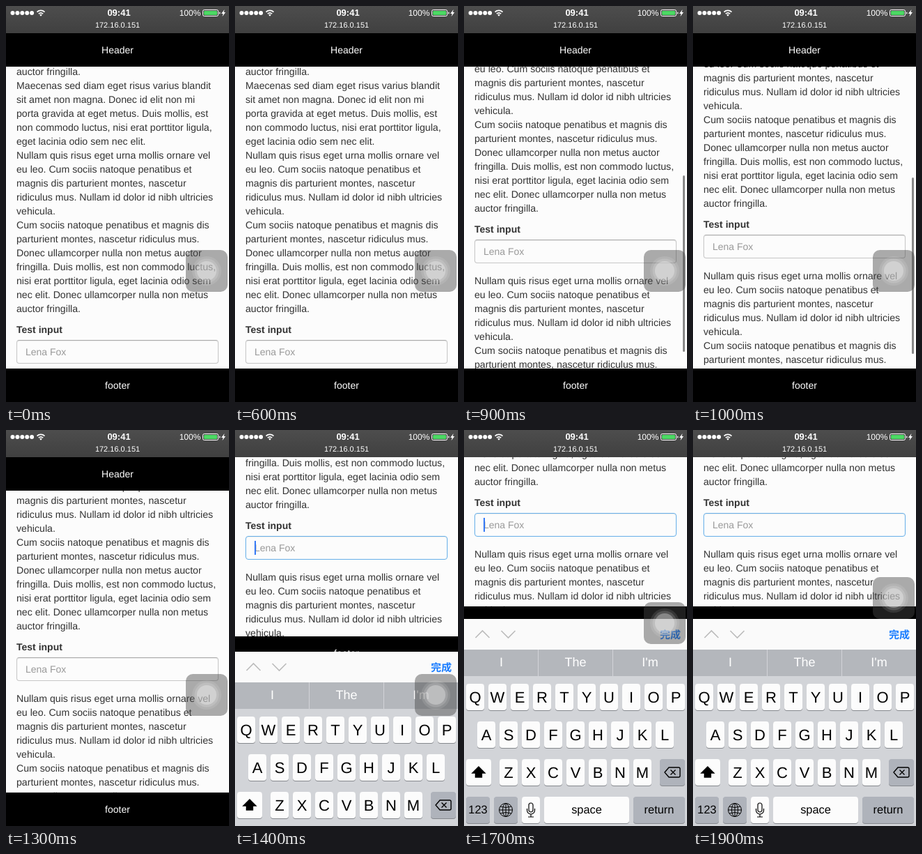
Recreate the animation shown at these times as an HTML page. Size 320x568 px, loop 2 s.

```html
<!DOCTYPE html>
<html lang="en">
<head>
<meta charset="utf-8">
<style>
html, body { margin: 0; width: 100%; height: 100%; overflow: hidden; }
body { font: 14px/20px "Liberation Sans", Arial, sans-serif; text-rendering: geometricPrecision; }
div, span, svg { position: absolute; box-sizing: border-box; }
#stage { width: 320px; height: 568px; overflow: hidden; background: #fcfcfc; color: #333; }
#page { left: 15px; top: 84px; width: 290px; font-size: 14.15px; white-space: pre; }
#more { top: 444px; }
#label { top: 370px; font-weight: bold; font-size: 14px; }
#field { top: 395px; width: 290px; height: 34px; padding: 6px 12px; border: 1px solid #c6c6c6; border-top-color: #aaa;
  border-radius: 4px; box-shadow: inset 0 1px 1px #0001; color: #999; font-size: 14px; }
#field.focus { border-color: #66afe9; }
#caret { left: 12px; top: 6px; width: 2px; height: 20px; background: #3478f6; }
.bar { width: 320px; height: 48px; background: #000; color: #fff; line-height: 48px; text-align: center; }
#header { top: 39px; line-height: 49px; }
#status { width: 320px; height: 39px; background: linear-gradient(#4d4d4d, #404040); color: #fff; }
#status span { white-space: nowrap; transform: translate(-50%, -50%); }
#thumb { left: 314px; width: 3px; height: 253px; border-radius: 2px; background: #888; }
#keyboard { width: 320px; height: 300px; background: #d2d4d8; color: #000; }
#tools { width: 320px; height: 44px; background: #fafafa; }
#done { left: 281px; top: 13px; color: #1a7dff; font: bold 15px/20px "Noto Sans CJK SC", "Noto Sans CJK", sans-serif; white-space: nowrap; }
.hint { top: 44px; width: 107px; height: 38px; background: #b4b7bc; color: #fff; font-size: 18px; line-height: 37px; text-align: center; }
.hint + .hint { border-left: 1px solid #d2d4d8; }
.key { height: 38px; border-radius: 4px; background: #fcfcfc; box-shadow: 0 1px #85888d; font-size: 22px; line-height: 39px; text-align: center; }
.dark { background: #afb3bb; }
.word { font-size: 16.4px; }
.key svg { left: 50%; top: 50%; transform: translate(-50%, -50%); }
#touch { left: 258px; width: 60px; height: 60px; border-radius: 10px; background: rgba(70, 70, 70, .45); }
#touch span { left: 50%; top: 50%; border-radius: 50%; transform: translate(-50%, -50%); }
</style>
</head>
<body>
<div id="stage">
  <div id="page"><div id="text"></div><div id="label">Test input</div>
    <div id="field">Lena Fox<div id="caret"></div></div><div id="more"></div></div>
  <div id="thumb"></div>
  <div id="header" class="bar">Header</div>
  <div id="footer" class="bar">footer</div>
  <div id="status">
    <svg width="320" height="20" fill="#fff">
      <path d="M9.5 10h28" stroke="#fff" stroke-width="6" stroke-linecap="round" stroke-dasharray="0 6.9"/>
      <g fill="none" stroke="#fff" stroke-width="1.7"><path d="M44.5 8.6a8 8 0 0 1 11 0M46.8 11.2a4.8 4.8 0 0 1 6.4 0"/></g>
      <path d="M50 14.8l-1.8-2.1a2.6 2.6 0 0 1 3.6 0z"/>
      <rect x="282.5" y="5.5" width="22" height="9" rx="2" fill="none" stroke="#fff"/>
      <rect x="284" y="7" width="19" height="6" rx="1" fill="#4cd964"/>
      <path d="M306 8.5q1.5 0 1.5 1.5t-1.5 1.5zM313.5 5l-4.5 6h2.5l-1 4 4.5-6h-2.5z"/>
    </svg>
    <span style="left:162px;top:10px;font-size:13px;font-weight:bold">09:41</span>
    <span style="left:264px;top:10px;font-size:12px">100%</span>
    <span style="left:160px;top:28px;font-size:11px">172.16.0.151</span>
  </div>
  <div id="keyboard">
    <div id="tools">
      <svg width="90" height="44" fill="none" stroke="#bcbcbc" stroke-width="1.6"><path d="M16.5 27l10-10 10 10M53.5 17l10 10 10-10"/></svg>
      <div id="done">完成</div>
    </div>
  </div>
  <div id="touch"></div>
</div>
<script>
const $ = id => document.getElementById(id);

const nullam = `Nullam quis risus eget urna mollis ornare vel
eu leo. Cum sociis natoque penatibus et
magnis dis parturient montes, nascetur
ridiculus mus. Nullam id dolor id nibh ultricies
vehicula.
Cum sociis natoque penatibus et magnis dis
parturient montes, nascetur ridiculus mus.
Donec ullamcorper nulla non metus auctor
fringilla. Duis mollis, est non commodo luctus,
nisi erat porttitor ligula, eget lacinia odio sem
nec elit. Donec ullamcorper nulla non metus
auctor fringilla.`;
$('text').textContent = `auctor fringilla.
Maecenas sed diam eget risus varius blandit
sit amet non magna. Donec id elit non mi
porta gravida at eget metus. Duis mollis, est
non commodo luctus, nisi erat porttitor ligula,
eget lacinia odio sem nec elit.
` + nullam;
$('more').textContent = nullam;

function add(parent, cls, style, html = '') {
  const el = document.createElement('div');
  el.className = cls;
  el.innerHTML = html;
  for (const k in style) el.style[k] = style[k] + 'px';
  parent.append(el);
}
const key = (left, row, width, html, cls = '') =>
  add($('keyboard'), 'key ' + cls, { left, top: 93 + 54 * row, width }, html);
const icon = (body, line = 1.4) =>
  `<svg width="26" height="26" viewBox="-13 -13 26 26" fill="none" stroke="#000" stroke-width="${line}">${body}</svg>`;

['I', 'The', "I'm"].forEach((word, i) => add($('keyboard'), 'hint', { left: i * 107 - (i > 0) }, word));
[['QWERTYUIOP', 3], ['ASDFGHJKL', 19], ['ZXCVBNM', 51]].forEach(([letters, x], row) =>
  [...letters].forEach((c, i) => key(x + 32 * i, row, 26, c)));
key(3, 2, 36, icon('<path fill="#000" d="M0-8l9 9H4.5v6h-9V1H-9z"/>'));
key(281, 2, 36, icon('<path d="M-11 0l6-7H9q2 0 2 2V5q0 2-2 2H-5zM-2.5-3.5l7 7m0-7l-7 7"/>'), 'dark');
key(3, 3, 34, '123', 'dark word');
key(43, 3, 34, icon('<circle r="9.5"/><ellipse rx="4.5" ry="9.5"/><path d="M0-9.5v19M-9.5 0h19M-8-5q8 3 16 0M-8 5q8-3 16 0"/>', 1), 'dark');
key(83, 3, 26, icon('<rect x="-3" y="-10" width="6" height="13" rx="3"/><path d="M-5.5-2v2.5a5.5 5.5 0 0 0 11 0V-2M0 6v4M-4 10h8"/>', 1.2));
key(115, 3, 122, 'space', 'word');
key(243, 3, 74, 'return', 'dark word');

for (const [size, alpha] of [[42, .1], [35, .15], [28, .3]])
  $('touch').innerHTML += `<span style="width:${size}px;height:${size}px;background:rgba(255,255,255,${alpha})"></span>`;

const setTop = (id, y) => $(id).style.top = y + 'px';
const show = (id, on) => $(id).style.display = on ? '' : 'none';

function draw(step) {
  const drag = Math.max(0, step - 7);   // page flick begins at 800 ms
  const typed = step - 14;              // keyboard begins at 1400 ms
  const focus = typed >= 0;
  const flick = Math.round(153 * (1 - Math.exp(-1.415 * drag)));
  const scroll = !focus ? flick : typed ? 360 : 327;
  const rise = Math.round(47 * Math.exp(-3.1 * typed));

  $('page').style.transform = `translateY(${-scroll}px)`;
  $('field').className = focus ? 'focus' : '';
  show('caret', focus && typed < 4);
  show('header', !focus);
  setTop('footer', !focus ? 520 : typed ? 253 : 296);
  show('keyboard', focus);
  setTop('keyboard', 271 + rise);

  show('thumb', drag && step < 13);
  setTop('thumb', 243 + .479 * (flick - 144));
  $('thumb').style.opacity = step < 12 ? 1 : .5;

  const p = Math.min(1, Math.max(0, (typed - 1) / 3));
  setTop('touch', 350 - 139 * p * p * (3 - 2 * p));
}

const start = performance.now();
function tick() {
  draw(Math.floor((performance.now() - start) % 2000 / 100));
  requestAnimationFrame(tick);
}
tick();
</script>
</body>
</html>
```
